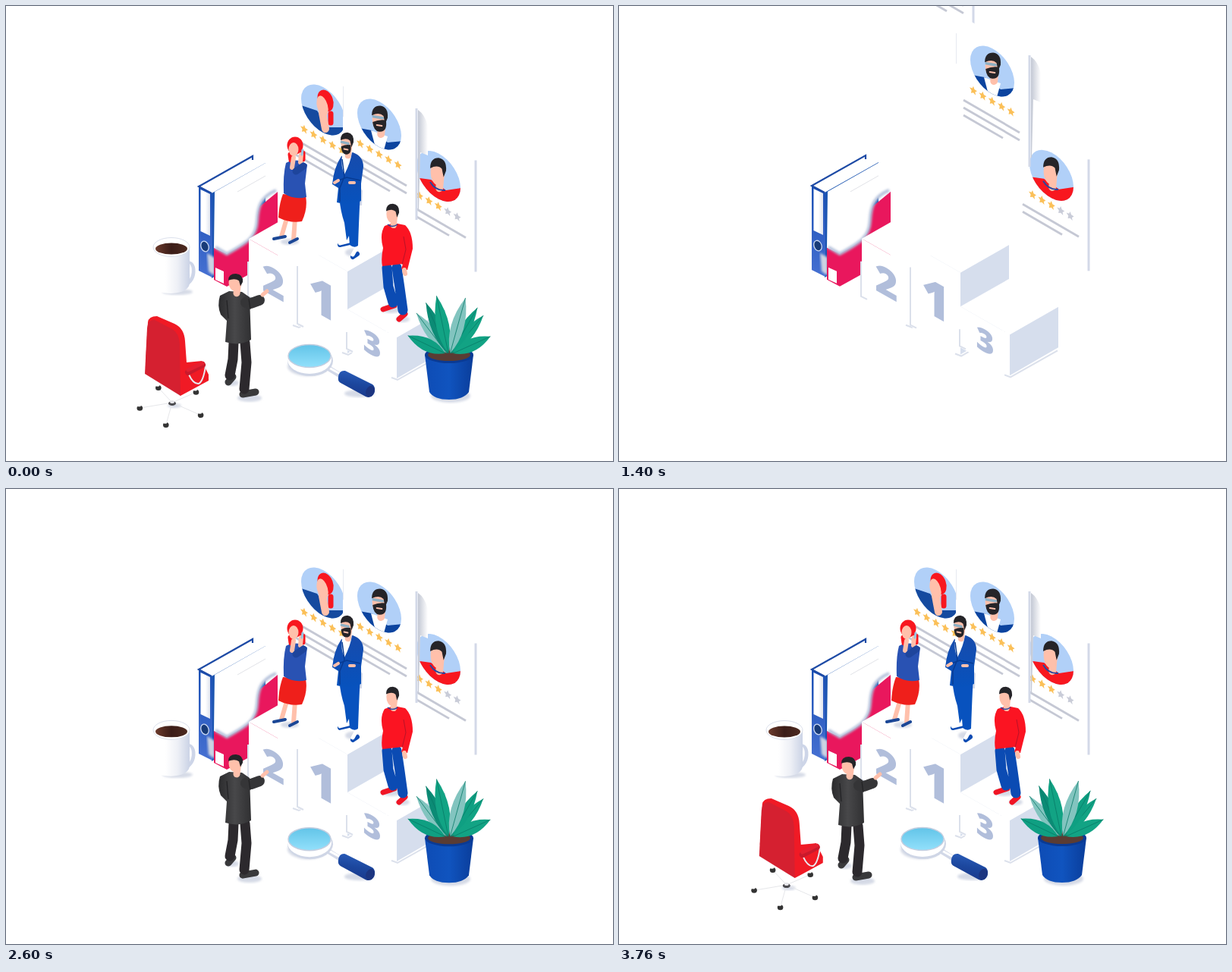
Animation, 800 px wide and 600 px high, one loop 3800 ms. Source, as an HTML page:

```html
<!DOCTYPE html>
<html lang="en">
<head>
<meta charset="utf-8">
<title>Candidate ranking</title>
<style>
html, body { margin: 0; width: 100%; height: 100%; overflow: hidden; background: #fff; }
svg { display: block; width: 800px; height: 600px; }
text { font: 800 46px "Open Sans", "Noto Sans", sans-serif; fill: #b1bedb; text-anchor: middle; }
</style>
</head>
<body>
<script>
const SKIN = '#ffc0ab', BLUE = '#0b4bb3', RED = '#f8171f', DARK = '#252428', GRAY = '#dbe0eb';
const SLOPE = .565;

const p = (fill, d, more = '') => `<path fill="${fill}" d="${d}" ${more}/>`;
const line = (stroke, w, d, more = '') =>
  `<path fill="none" stroke="${stroke}" stroke-width="${w}" d="${d}" ${more}/>`;
const limb = (color, w, d) => line(color, w, d, 'stroke-linecap="round" stroke-linejoin="round"');
const oval = (fill, x, y, rx, ry, more = '') =>
  `<ellipse fill="${fill}" cx="${x}" cy="${y}" rx="${rx}" ry="${ry}" ${more}/>`;
const soft = 'filter="url(#soft)"';
const shade = (x, y, rx, ry) => oval('#d5dae6', x, y, rx, ry, soft);
const group = (id, body) => `<g id="${id}">${body}</g>`;
const grad = (id, dir, ...colors) => `<linearGradient id="${id}" ${dir}>` + colors.map((c, i) =>
  `<stop offset="${i / (colors.length - 1)}" stop-color="${c}"/>`).join('') + '</linearGradient>';
const DOWN = 'x2="0" y2="1"';

// Upright isometric wall of width w (negative: to the left) and height h, falling by dy.
const wall = (fill, x, y, w, dy, h) => p(fill, `M${x} ${y}l${w} ${dy}v${h}l${-w} ${-dy}Z`);
const range = n => [...Array(n).keys()];

const defs = `<defs>
  <filter id="soft"><feGaussianBlur stdDeviation="1.5"/></filter>
  ${grad('spine', DOWN, '#1b50b4', '#4670d2')}
  ${grad('label', '', '#fff', '#fff', '#dfe4ee')}
  ${grad('mug', '', '#fff', '#fff', '#eef0f6', '#cbd3e6')}
  ${grad('coffee', '', '#6b3a2c', '#3b1d18', '#4d2a20')}
  ${grad('lens', DOWN, '#62c4e8', '#92e0fb')}
  ${grad('grip', 'x1=".6" x2=".4" y2="1"', '#2a5dba', '#1c479e', '#19378a')}
  ${grad('pot', '', '#0e4cb5', '#1054bf', '#0a3d9a')}
  ${grad('coat', '', '#2b2b2d', '#48484a', '#303032')}
  ${grad('cast', '', '#c3c8d4', '#fff')}
  ${grad('suit', DOWN, '#174bac', '#0752bd')}
</defs>`;

function head(x, y, w, h) {
  const at = (dx, dy) => `${x + dx * w} ${y + dy * h}`;
  return limb(SKIN, w * .9, `M${at(.3, .5)} ${at(.2, 1.25)}`) + oval(SKIN, x, y, w * .85, h) +
    p(DARK, `M${at(-.9, -.3)}Q${at(-.9, -1.1)} ${at(.1, -1.1)} ${at(1.1, -1)} ${at(1, -.1)}
      L${at(.7, .4)} ${at(.5, -.25)}Q${at(0, -.6)} ${at(-.9, -.3)}Z`);
}

function beard(x, y, w, h) {
  return p(DARK, `M${x - w * .8} ${y + h * .25}Q${x} ${y} ${x + w * .8} ${y + h * .1}
    Q${x + w} ${y + h * 1.1} ${x} ${y + h * 1.05} ${x - w * .7} ${y + h} ${x - w * .8} ${y + h * .25}Z`) +
    limb(SKIN, 2, `M${x - w * .3} ${y + h * .5}l${w * .6} 1`) +
    limb('#8eb0c4', 3.5, `M${x - w * .7} ${y - h * .2}l${w * 1.1} 2`);
}

function star(x, y, fill) {
  const pts = range(10).map(i => {
    const a = i * Math.PI / 5 - Math.PI / 2, r = i % 2 ? 2.8 : 5.8, dx = r * Math.cos(a) * .9;
    return `${x + dx},${y + r * Math.sin(a) + dx * .5}`;
  });
  return `<polygon fill="${fill}" points="${pts.join(' ')}"/>`;
}

// Profile sheet around the portrait centre (x, y).
function card(id, x, y, gold, rows, figure) {
  const disc = `<circle r="30" transform="matrix(.967 .5 0 1 ${x} ${y})"`;
  const rating = range(5).map(i =>
    star(x - 25 + i * 12.4, y + 25.5 + i * 7, i < gold ? '#fbc058' : '#c9ccd8'));
  const rules = range(rows).map(i => {
    const w = i < rows - 1 ? 74 : 52;
    return line('#c5c8d4', 2.8, `M${x - 38} ${y + 38 + i * 10}l${w} ${w * .58}`);
  });
  return wall('#fff', x - 48, y - 77, 97, 56, 148) +
    `<clipPath id="${id}">${disc}/></clipPath>${disc} fill="#b1d0f8"/>
     <g clip-path="url(#${id})">${figure}</g>` +
    rating.join('') + rules.join('') + line('#d3d9e8', 3, `M${x + 49} ${y - 21}v147`);
}

const card1 = group('card1', card('c1', 418, 137, 5, 3,
  p('#154a9f', 'M386 130 410 138 424 160 445 160V174H386Z') +
  oval(RED, 421, 125, 10, 15, 'transform="rotate(-20 421 125)"') + limb(RED, 7, 'M428 142 428 154') +
  limb(SKIN, 10, 'M417 141 421 162') + oval(SKIN, 417, 132, 7, 14, 'transform="rotate(-15 417 132)"')));

const card2 = group('card2', card('c2', 492, 156, 5, 3,
  p('#0c449f', 'M460 160 482 164 503 180 525 178V194H460Z') +
  p('#fff', 'M481 164 503 172 498 190 486 183Z') +
  head(492, 149, 11, 16) + beard(492, 149, 11, 16)) +
  line('#e6e9f1', 1, 'M444.5 106V146') +
  p('url(#cast)', 'M543 137Q552 143 556 158V197L546 193 544 270H543Z'));

const card3 = group('card3', card('c3', 570, 224.5, 3, 2,
  p(RED, 'M538 226 560 229 580 243 600 240V262H538Z') +
  head(569, 219, 11, 17) + line('#27479f', 2, 'M559 232Q566 244 579 243')));

const binder = group('binder',
  p('#fff', 'M254 238 325 198 342 207 271 247Z') +
  wall('#1a54b0', 271, 247, 71, -40, 112) +
  wall('url(#spine)', 254, 238, 18, 9, 111) +
  wall('url(#label)', 256.5, 242, 12.5, 6, 55) +
  line('#1d4aa5', 2.2, 'M271 247 254 238 325 198V203') +
  oval('#183b78', 262, 317, 5, 7, 'stroke="#cbd8f2" stroke-width="1.3" transform="rotate(-20 262 317)"'));

const edge = 'C335 252 332 265 331 283 330 305 318 312 291 327';
const folder = group('folder',
  p('#ccd3e2', 'M265 326 275 332V356L267 350Z', soft) +
  p('#e9175d', 'M274 318 291 300 358 245V333L291 370 274 361Z') +
  p('#fff', `M275 245 342 207V228L358 236V243${edge}L274 319Z`) +
  line('#b3c0da', 4, `M356 243${edge}L276 318`, soft) +
  line('#e2e3e8', 1, 'M305 245 342 224') +
  wall('#fff', 276, 345, 11, 5, 16));

// Podium step: (x, y) is the front corner of its top.
function step(id, mark, x, y, h) {
  const w = 65, dy = 37, size = 18 + h * .43;
  return group(id,
    wall('#fff', x, y, -w, -dy, h) + wall('#d6deed', x, y, w - 1, -dy, h) +
    p('#fff', `M${x} ${y}l${-w} ${-dy} ${w} ${-dy} ${w} ${dy}Z`) +
    line(GRAY, 2, `M${x - w - 1} ${y - 7}v${h - 32}l8 4M${x - 7} ${y + h - 1}l8 3 62 -35`) +
    `<text transform="matrix(1 ${SLOPE} 0 1 ${x - w / 2} ${y - dy / 2 + h / 2 + size * .36})"
      style="font-size:${size}px">${mark}</text>`);
}

const woman = group('woman',
  shade(374, 311, 12, 4) +
  limb(SKIN, 6, 'M370 280 363 304M381 280 379 308') +
  limb('#1b4796', 4, 'M353 307 368 304M374 312 384 307') +
  p('#ef1f1b', 'M365 248 395 251Q398 267 390 284 375 287 359 279 360 261 365 248Z') +
  p('#2952b3', 'M369 207Q382 199 397 209L394 234 396 252Q380 256 366 247 365 222 369 207Z') +
  oval(RED, 381, 184, 10.5, 11.5) + limb(RED, 7, 'M375 196 376 203M391 194 391 202') +
  oval(SKIN, 379, 189, 6.5, 9) + limb(SKIN, 6, 'M377 213 379 200M388 206 389 196') +
  limb('#9ac5e0', 3, 'M391 190 390 196') +
  limb('#1e459c', 9, 'M392 211 382 218'));

const boss = group('boss',
  p('#d4daea', 'M460 240 470 243 469 263 460 262Z') + shade(456, 325, 9, 5) +
  limb(BLUE, 6, 'M440 315 453 312M457 331 463 327') +
  limb('#fff', 5, 'M440 313 452 310M457 328 462 319') +
  p('#0852be', 'M439 243 467 244Q465 285 464 316 459 320 453 315L452 303 449 309 446 286Q439 265 439 243Z') +
  p('url(#suit)', 'M442 198 457 193Q471 198 471 212L468 234V257Q452 264 436 259L438 240 430 235Q432 213 442 198Z') +
  p('#fff', 'M443 197 456 193Q454 207 446 222 441 212 443 197Z') +
  head(449, 181, 9, 13) + beard(448, 182, 8, 13) +
  line('#073b93', 1.5, 'M433 232 449 226 467 230M443 202 446 225 440 240V258') +
  limb(SKIN, 4, 'M433 233 438 230M453 233 459 233'));

const runner = group('runner',
  shade(508, 400, 14, 5) + shade(523, 413, 9, 4) +
  limb('#f01525', 7, 'M497 400 512 395M518 413 526 406') +
  limb(BLUE, 13, 'M502 345 504 370 510 391M515 345 519 372 523 401') +
  p('#fb1422', 'M499 290 511 286 526 289Q536 298 536 320L529 348 521 347 523 340 496 343Q494 333 497 319 492 301 499 290Z') +
  line('#b91227', 1, 'M524 304 527 321 522 341') +
  limb(SKIN, 6, 'M525 348 526 353') + head(509, 274, 9, 12) +
  line('#27479f', 1.5, 'M503 288Q509 293 516 288'));

function leaf(x, y, tx, ty, w, fill) {
  const dx = tx - x, dy = ty - y, n = Math.hypot(dx, dy);
  const side = k => `${x + dx * .45 - dy / n * k} ${y + dy * .45 + dx / n * k}`;
  return p(fill, `M${x} ${y}Q${side(w)} ${tx} ${ty}Q${side(-w)} ${x} ${y}Z`) +
    line('#087a68', .8, `M${x} ${y}L${tx} ${ty}`);
}

// Leaves fan out by angle from the vertical; the flatter, the shorter.
const foliage = [-38, 41, -24, 31, -12, 16, -65, 66].map((deg, i) => {
  const a = deg * Math.PI / 180, len = 84 - .37 * Math.abs(deg);
  return leaf(584 + deg * .08, 458, 584 + len * Math.sin(a), 460 - len * Math.cos(a),
    i > 3 ? 17 : 14, i % 5 ? ['#0f9f82', '#12a384', '#0b8b75'][i % 3] : '#82c4bf');
}).join('');

const plant = group('plant',
  shade(586, 514, 26, 9) +
  p('url(#pot)', 'M552 460H616L610 509Q603 519 584 519 564 519 558 509Z') +
  oval('#0a3a94', 584, 460, 32, 11) + oval('#5a3c33', 584, 460, 28, 8) + foliage);

const glass = group('glass',
  shade(398, 475, 27, 13) + shade(466, 511, 20, 5) +
  line('#d2d8e8', 7, 'M424 477 442 488') + line('#fff', 3, 'M424 476 442 486') +
  oval('#cfd6e6', 401, 468, 30, 20) + oval('#fff', 400, 466, 29, 19) +
  oval('url(#lens)', 400, 461.5, 28, 15, 'stroke="#c3cee0" stroke-width="1.5"') +
  p('url(#grip)', 'M438 489Q439 480 447 481L483 499Q488 503 485 511 481 518 474 515L441 497Q437 495 438 489Z') +
  oval('#1c3580', 480, 508, 5.5, 7.5, 'transform="rotate(25 480 508)"'));

const cup = group('cup',
  shade(226, 377, 20, 4) +
  line('#cdd5e8', 5, 'M235 338Q248 337 247 351 246 364 233 369') +
  line('#f6f7fb', 2, 'M234 338Q245 338 244 351 243 362 233 366') +
  p('url(#mug)', 'M194 318H242V366Q240 378 218 379 196 379 194 367Z') +
  oval('#fff', 218, 318, 24, 12.5, 'stroke="#dbe0ec"') +
  oval('url(#coffee)', 218, 320, 21, 7.5));

const casters = range(5).map(i => {
  const a = (29 + i * 72) * Math.PI / 180;
  const x = 219 + 43 * Math.cos(a), y = 527 + 26 * Math.sin(a);
  return line('#e6e7ea', 1, `M219 523L${x} ${y}`) +
    oval('#333', x, y, 3.8, 3.5) + oval('#fff', x - 1, y - 3, 2.5, 1.2);
}).join('');

const chair = group('chair',
  shade(222, 527, 9, 3) + casters + oval('#4a4a4e', 219, 524, 5, 3) + oval('#e5e5e9', 219, 522, 3, 2) +
  p('#f01a25', 'M184 470 187 417Q188 409 199 409L222 419Q235 425 236 442L238 470 258 468 267 486V494L230 514Z') +
  p('#d52030', 'M183 485 186 425Q187 413 196 414L219 426Q228 431 229 446L230 514Z') +
  line('#e9e9ef', 2, 'M241 486Q247 499 254 498 260 495 263 475') +
  limb('#c91a2c', 8, 'M240 483 259 473') + limb('#e42030', 5, 'M240 480 259 471'));

const speaker = group('speaker',
  shade(321, 517, 16, 5) + shade(298, 497, 9, 4) +
  limb('#39393b', 9, 'M293 496 299 489M312 512 329 509') +
  limb('#2c292d', 13, 'M300 444 299 466 295 487M315 444 317 470 314 505') +
  p('url(#coat)', 'M282 382 294 376 311 377 321 384 323 440Q308 449 289 443L291 415 283 407Q278 395 282 382Z') +
  limb('#353537', 14, 'M316 391 323 392 334 388') +
  line('#222224', 1.2, 'M291 388 293 412M320 386 322 400') +
  limb(SKIN, 5, 'M338 381 344 376') + head(302, 365, 10, 11));

document.body.innerHTML = `<svg viewBox="0 0 800 600">${defs}<g id="stage">${
  [card3, card1, card2, binder, folder, step('second', 2, 385, 344, 78), step('first', 1, 450, 350, 108),
    step('third', 3, 515, 437, 54), woman, boss, runner, cup, glass, plant, chair, speaker].join('')}</g></svg>`;

// Landing times in ms, by way of entry.
const drops = { binder: 812, folder: 895, card3: 1230, card2: 1425, card1: 1478, woman: 1604,
  boss: 1743, runner: 1778, plant: 1863, glass: 1918, cup: 2095, speaker: 2290 };
const rises = { second: 1057, first: 1211, third: 1270 };
const entries = (lands, speed, dx, dy) => Object.entries(lands).map(([id, land]) =>
  ({ el: document.getElementById(id), land, speed, dx, dy }));
const parts = [...entries(drops, 2.8, 0, 1), ...entries(rises, .65, 0, -1),
  ...entries({ chair: 3310 }, 2.8, .894, -.447)];
const stage = document.getElementById('stage');

// Straight approach at constant speed, then a damped swing around the resting place.
const swing = (t, speed) => t < 0 ? t * speed
  : 22.5 * speed * Math.sin(.01885 * t) * Math.exp(-.0072 * t);

function draw(now) {
  const time = Math.floor(now % 3800 / 40) * 40;
  stage.setAttribute('visibility', time >= 40 && time < 600 ? 'hidden' : 'visible');
  for (const { el, land, speed, dx, dy } of parts) {
    const s = time < 40 ? 0 : swing(time - land, speed);
    el.setAttribute('transform', `translate(${s * dx} ${s * dy})`);
  }
}
const start = performance.now();
function tick() {
  draw(performance.now() - start);
  requestAnimationFrame(tick);
}
tick();
</script>
</body>
</html>
```
